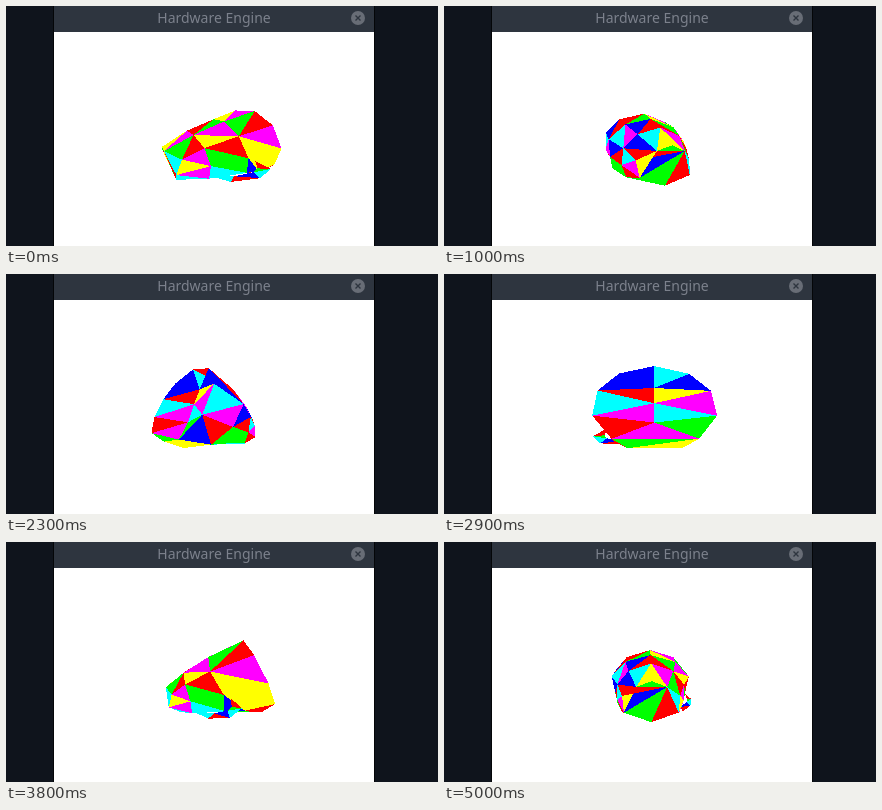
Write an HTML page that moves like this. It is 432 px wide and 240 px high and loops after 5.2 s.

```html
<!DOCTYPE html>
<html lang="en">
<head>
<meta charset="utf-8">
<title>Hardware Engine</title>
<style>
html, body { margin: 0; width: 100%; height: 100%; overflow: hidden; background: #0f141c; }
svg { display: block; width: 432px; height: 240px; }
text { font: 14px "Noto Sans", sans-serif; fill: #7c818c; text-anchor: middle; }
</style>
</head>
<body>
<svg viewBox="0 0 432 240">
  <rect width="432" height="240" fill="#0f141c"/>
  <rect x="47" width="322" height="240" fill="#040608"/>
  <rect x="48" width="320" height="26" fill="#2e353f"/>
  <rect x="48" y="26" width="320" height="214" fill="#fff"/>
  <text x="208" y="17">Hardware Engine</text>
  <circle cx="352" cy="12" r="7" fill="#686d76"/>
  <path d="M349.5 9.5l5 5m0-5l-5 5" stroke="#2e353f" stroke-width="1.4"/>
  <g id="mesh" shape-rendering="crispEdges"></g>
</svg>
<script>
// Vertices: length, width, height. Lower case is the mirrored side.
const centre = {
  A: [25, 0, 44.6], D: [0, 0, 33], E: [-27, 0, 20], N: [-49, 0, 4.5],
  P: [-36.5, 0, -25.5], I: [18, 0, 28], J: [24, 0, 14], K: [30, 0, -2], O: [5, 0, -24]
};
const side = {
  B: [29, 28, 37], F: [5, 40, 12], G: [-19, 29, 3], H: [-25, 18.5, 14],
  L: [0, 25, 26], M: [36, 42.6, 22], R: [45, 43, 3], S: [-47.7, 10.4, 0.7],
  T: [-39, 20, -18], U: [-35, 22, -6], V: [-14, 30, -11], W: [15, 38.5, -5],
  X: [15, 36, -17], Y: [-14, 26, -21.5], Z: [52, 28, -12], C: [30, 32, -17], Q: [44, 19, -19.5]
};
const loop = {
  1: [-14, 28, -19], 2: [2, 33, -24], 3: [20, 46, -20], 4: [28, 49, -13],
  5: [20, 40, -7], 6: [6, 31, -20], 7: [18, 41, -16], 8: [21, 42, -13]
};
const faces = {
  '#f00': 'BMF FGW DEH HUG SPT Ssu sgu blf Abl wgv DEh rwc KRZ MIJ CZQ XCQ vty Kzq 236 458',
  '#0f0': 'BLF DLH GWV WXV HSU StP SsN ADl wvx vyx wxc zZQ QqO QCO YPO ytP yPO Krz 748',
  '#00f': 'WXC Sut mbf fgw lDh hgs rzc ABI bmI BMI 637 xcO',
  '#ff0': 'ADL HGF FRW RWC RZC UVT ENS ENs tus mIJ zQq zcq',
  '#f0f': 'ABL MRF LHF GUV TVY EHS rfw lhg vut mrJ JRK KZz qcO',
  '#0ff': 'VXY STU YTP mfr lfg guv Ehs AbI MRJ JrK XYO CXO xyO cxO 126 347'
};

const CX = 208, CY = 146, EYE = 144, STEP = 0.15, START = 0.379;
const verts = { ...centre, ...side, ...loop };
for (const [name, [u, v, h]] of Object.entries(side)) verts[name.toLowerCase()] = [u, -v, h];

const mesh = document.getElementById('mesh');
const tris = Object.entries(faces).flatMap(([fill, list]) =>
  list.split(' ').map(names => ({ fill, names: [...names], depth: 0 })));
const slots = tris.map(() =>
  mesh.appendChild(document.createElementNS('http://www.w3.org/2000/svg', 'polygon')));

function project([u, v, h], c, s) {
  const w = v - 1.4;
  const z = w * c - u * s;
  const k = EYE / (EYE - z);
  const x = u * c + w * s;
  return { x: CX + k * x, y: CY - k * h, d: Math.hypot(x, h, EYE - z) };
}

function draw(step) {
  const angle = START + step * STEP;
  const c = Math.cos(angle), s = Math.sin(angle);
  const pts = {};
  for (const name in verts) pts[name] = project(verts[name], c, s);
  for (const t of tris) t.depth = t.names.reduce((sum, n) => sum + pts[n].d, 0);
  tris.sort((a, b) => b.depth - a.depth);
  tris.forEach((t, i) => {
    slots[i].setAttribute('fill', t.fill);
    slots[i].setAttribute('points',
      t.names.map(n => pts[n].x.toFixed(2) + ',' + pts[n].y.toFixed(2)).join(' '));
  });
}

const begin = performance.now();
let shown = -1;
function tick() {
  const ms = (performance.now() - begin) % 5200;
  const step = Math.min(50, Math.floor(ms / 100));
  if (step !== shown) draw(shown = step);
  requestAnimationFrame(tick);
}
tick();
</script>
</body>
</html>
```
